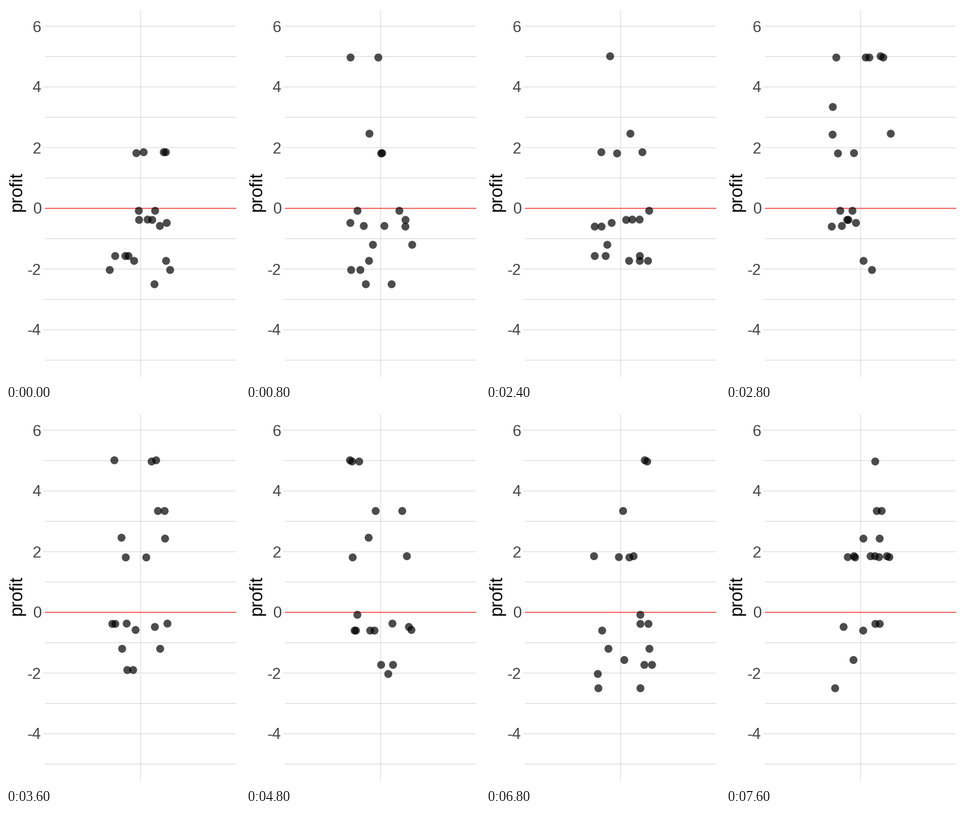
Recreate the animation shown at these times as a matplotlib script. Size 360x576 px, loop 8000 ms.

```python
import random

import matplotlib.pyplot as plt
from matplotlib.animation import FuncAnimation

WIDTH, HEIGHT, DPI = 360, 576, 72
INTERVAL, DRAWS, SAMPLE_SIZE = 400, 20, 19
ZERO_Y, UNIT = 310, 46.5
LEFT, RIGHT, MIDDLE = 60, 354, 207
JITTER = 48.8
GRID, LABEL = "#d9d9d9", "#444444"

PROFITS = [5.01, 4.97, 3.34, 2.46, 2.43, 1.85, 1.82, 1.81, -0.08, -0.37,
           -0.38, -0.48, -0.58, -0.6, -1.2, -1.57, -1.73, -1.9, -2.03, -2.5]


def to_y(profit):
    return ZERO_Y - UNIT * profit


def resample(draw):
    """Sample the profits with replacement and jitter them sideways."""
    rng = random.Random(draw)
    return [(MIDDLE + rng.uniform(-JITTER, JITTER), to_y(profit))
            for profit in rng.choices(PROFITS, k=SAMPLE_SIZE)]


plt.rcParams["font.family"] = "Liberation Sans"
fig = plt.figure(figsize=(WIDTH / DPI, HEIGHT / DPI), dpi=DPI,
                 facecolor="white")
ax = fig.add_axes([0, 0, 1, 1])
ax.set(xlim=(0, WIDTH), ylim=(HEIGHT, 0))
ax.axis("off")


def line(xs, ys, color=GRID):
    ax.plot(xs, ys, color=color, lw=1, solid_capstyle="butt", snap=False)


for value in range(-5, 7):
    y = to_y(value)
    major = value % 2 == 0
    line([LEFT - 3 if major else LEFT, RIGHT], [y, y])
    if major:
        ax.text(54.3, y + 8.5, str(value), size=24, color=LABEL,
                ha="right", va="baseline")
line([MIDDLE, MIDDLE], [6, 568])
line([LEFT, RIGHT], [ZERO_Y, ZERO_Y], "red")
ax.text(24.5, 284.7, "pro\ufb01t", size=27.5, color="black", rotation=90,
        rotation_mode="anchor", ha="center", va="baseline")

# One size per dot keeps the circles at subpixel positions.
dots = ax.scatter([0] * SAMPLE_SIZE, [0] * SAMPLE_SIZE,
                  s=[12.2 ** 2] * SAMPLE_SIZE, color="black", alpha=0.7,
                  linewidths=0, zorder=3)


def update(draw):
    dots.set_offsets(resample(draw))
    return [dots]


anim = FuncAnimation(fig, update, frames=DRAWS, interval=INTERVAL,
                     repeat=True, repeat_delay=0)
plt.show()
```
